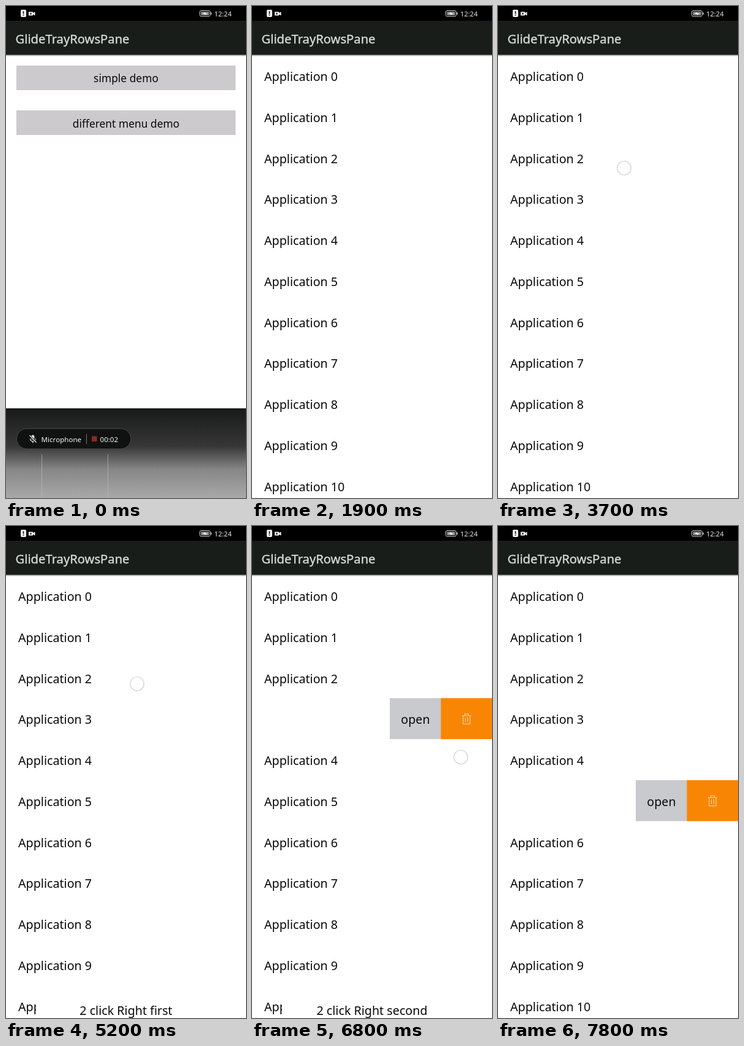
Recreate the animation shown at these times as an HTML page. Size 392 px wide and 801 px high, loop 8 s.

```html
<!DOCTYPE html>
<html lang="en">
<head>
<meta charset="utf-8">
<title>Swipe list</title>
<style>
  html, body { margin: 0; width: 100%; height: 100%; overflow: hidden; background: #fff; }
  svg { display: block; width: 100%; height: 100%; }
  text { font-family: "Noto Sans", "Open Sans", sans-serif; font-size: 19.7px; fill: #0a0a0a; }
  .mid { text-anchor: middle; }
  .button { font-size: 17.4px; }
  .title { font-size: 20.2px; fill: #d6d8d6; stroke: #d6d8d6; stroke-width: .4px; }
  .clock { font-size: 11.2px; fill: #e4e4e4; }
  .pill { font-size: 11.6px; fill: #f2f2f2; }
</style>
</head>
<body>
<svg viewBox="0 0 392 801" preserveAspectRatio="none">
  <defs>
    <linearGradient id="wall" x1="0" y1="0" x2="0" y2="1">
      <stop offset="0" stop-color="#181a19"/>
      <stop offset=".42" stop-color="#363636"/>
      <stop offset=".68" stop-color="#868686"/>
      <stop offset="1" stop-color="#a9a9a9"/>
    </linearGradient>
    <linearGradient id="shade" x1="0" y1="0" x2="0" y2="1">
      <stop offset="0" stop-color="#000" stop-opacity=".45"/>
      <stop offset="1" stop-color="#000" stop-opacity="0"/>
    </linearGradient>
    <g id="menu">
      <rect width="84" height="66.75" fill="#c8cacd"/>
      <rect x="83.5" width="84" height="66.75" fill="#f88604"/>
      <text class="mid" x="42" y="42">open</text>
      <path d="M118 28.5h15M122.5 28.5v-3h6v3M119.8 28.5V42h11.4V28.5M123.6 31.5V39M127.4 31.5V39"
            fill="none" stroke="#fcd9b0" stroke-width="1.1"/>
    </g>
  </defs>

  <rect width="392" height="801" fill="#fff"/>

  <g id="home">
    <rect x="17" y="97" width="358" height="40" fill="#cccacc"/>
    <rect x="17" y="170" width="358" height="40" fill="#cccacc"/>
    <text class="mid button" x="196" y="124">simple demo</text>
    <text class="mid button" x="196" y="197.5">different menu demo</text>
  </g>

  <g id="list"></g>

  <g id="toast">
    <rect x="49" y="766" width="294" height="35" fill="#fff"/>
    <text class="mid" x="196" y="796"></text>
  </g>

  <g id="desk">
    <rect y="655" width="392" height="146" fill="url(#wall)"/>
    <path d="M58.5 730v71M166.5 730v71" stroke="#b8b8b8" stroke-opacity=".7"/>
  </g>
  <g id="pill">
    <rect x="17.5" y="688" width="186.5" height="33" rx="16.5" fill="#101211" stroke="#484a49"/>
    <rect x="41.3" y="698.5" width="5" height="8" rx="2.5" fill="#f2f2f2"/>
    <path d="M39.5 704.5a4.4 4.4 0 0 0 8.8 0M43.9 709v2.5" fill="none" stroke="#f2f2f2" stroke-width="1.2"/>
    <path d="M38.5 699l11 11.5" stroke="#101211" stroke-width="3"/>
    <path d="M38.5 699l11 11.5" stroke="#f2f2f2" stroke-width="1.2"/>
    <text class="pill" x="57.5" y="709.5">Microphone</text>
    <path d="M131.5 697v16" stroke="#777"/>
    <rect x="140" y="700.5" width="8.5" height="8.5" fill="#8c2a21"/>
    <text class="pill" x="153.5" y="709.5">00:02</text>
  </g>

  <g id="header">
    <rect y="79" width="392" height="3.5" fill="url(#shade)"/>
    <rect width="392" height="79.5" fill="#181d1a"/>
    <rect width="392" height="24" fill="#000"/>
    <rect x="24" y="6" width="9" height="12" rx="2" fill="#f0f0f0"/>
    <path d="M28.5 8.5v4.2M28.5 14v1.6" stroke="#000" stroke-width="1.5"/>
    <path d="M37 9.5h7v1.8l3.5-1.8v6L44 13.7v1.8h-7z" fill="#f0f0f0"/>
    <circle cx="40.5" cy="12.5" r="1.2" fill="#000"/>
    <rect x="316.5" y="7.5" width="17" height="9.5" rx="2.5" fill="none" stroke="#d0d0d0"/>
    <rect x="318.3" y="9.3" width="13.4" height="6" rx="1" fill="#8d8d8d"/>
    <path d="M335.3 10.5V14" stroke="#d0d0d0" stroke-width="1.4"/>
    <path d="M320 12.8l5.5-2.6v1.7h4.5l-5.5 2.7v-1.8z" fill="#fff"/>
    <text class="clock" x="340" y="16.5">12:24</text>
    <text class="title" x="15.5" y="60.5">GlideTrayRowsPane</text>
  </g>

  <circle id="touch" r="11.3" fill="#fff" fill-opacity=".3" stroke="#cfcfcf" stroke-opacity=".85" stroke-width="1.4"/>
</svg>

<script>
const LOOP = 8000, STEP = 100, ROW = 66.75, TOP = 80, WIDE = 392, MENU = 167;
const HOLD = 90, SLIDE = 200, ACT = 250;
const el = id => document.getElementById(id);
const ramp = (t, a, b) => Math.min(1, Math.max(0, (t - a) / (b - a)));
const smooth = p => p * p * (3 - 2 * p);

const press = (at, time, x, y) => ({ at, until: at + time, x, y, reach: 0 });

// Each drag opens one row; the finger drifts right and up from drag to drag
const drags = [2400, 3100, 3610, 5200, 6310, 6800, 7300].map((at, i) => {
  const row = i < 3 ? i : i - 1;
  return {
    at, row, until: at + HOLD + SLIDE, reach: MENU,
    x: Math.min(341, 190 + 8 * i + 28 * (row - 2) ** 2),
    y: TOP + ROW * (row + 0.5) + 31 - 7 * i
  };
});

// Taps on the two menu buttons of the open row
const taps = [4300, 5610].map((at, i) => press(at, 300, 259 + 84 * i, 252));
const touches = [press(800, 100, 40, 60.5), press(1600, 100, 196, 118), ...taps, ...drags];

// An open row shuts at the next drag or when a tap takes effect
const acts = taps.map(tap => tap.at + ACT);
const shutAfter = at =>
  Math.min(...[...drags.map(d => d.at), ...acts].filter(e => e > at), 2 * LOOP);

const rows = Array.from({ length: 11 }, (_, i) => {
  const g = document.createElementNS("http://www.w3.org/2000/svg", "g");
  g.innerHTML = `<text x="20" y="42">Application ${i}</text><use href="#menu" x="${WIDE}"/>`;
  el("list").append(g);
  return g;
});

const fade = (id, value) => el(id).setAttribute("opacity", value);
const move = (node, x, y) => node.setAttribute("transform", `translate(${x} ${y})`);
const slide = (t, at) => smooth(ramp(t, at + HOLD, at + HOLD + SLIDE));

// Small overscroll that springs back after a drag
const pull = (t, at) => 5 * smooth(ramp(t, at, at + 200)) * (1 - ramp(t, at + 200, at + 400));

function draw(t) {
  move(el("desk"), 0, 146 * (1 - (1 - ramp(t, 0, 400)) ** 2));
  fade("pill", 1 - ramp(t, 0, 300));

  const page = ramp(t, 1600, 1900);
  fade("home", 1 - page);
  fade("list", page);

  const open = rows.map(() => 0);
  for (const { at, row } of drags) {
    const shut = shutAfter(at);
    open[row] += slide(t, at) - smooth(ramp(t, shut, shut + HOLD));
  }
  const shift = pull(t, drags[0].at) + pull(t, drags.at(-1).at);
  rows.forEach((g, i) => move(g, -MENU * open[i], TOP + ROW * i + shift));

  el("toast").lastElementChild.textContent =
    `2 click Right ${t < acts[1] ? "first" : "second"}`;
  fade("toast", ramp(t, acts[0], acts[0] + 150) - ramp(t, 6800, 7100));

  const touch = touches.find(p => t >= p.at && t < p.until);
  fade("touch", touch ? 1 : 0);
  if (touch) move(el("touch"), touch.x - touch.reach * slide(t, touch.at), touch.y);
}

const start = performance.now();
function tick() {
  const t = (performance.now() - start) % LOOP;
  draw(Math.floor(t / STEP) * STEP);
  requestAnimationFrame(tick);
}
tick();
</script>
</body>
</html>
```
